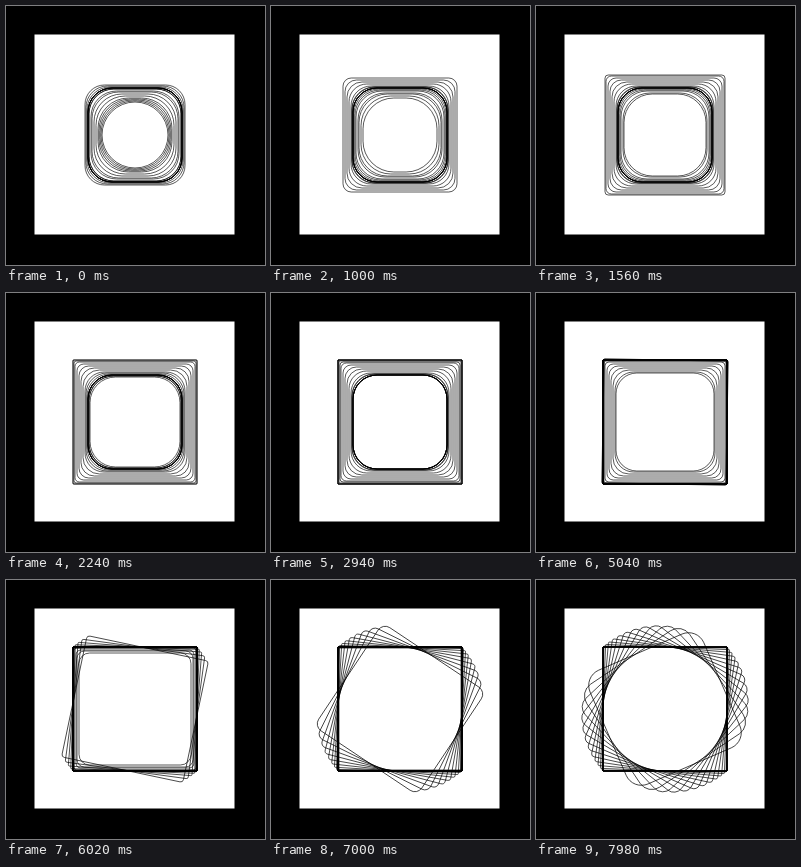
Write an HTML page with a canvas that moves like this. It is 259 px wide and 259 px high and loops after 8000 ms.

```html
<!DOCTYPE html>
<html lang="en">
<head>
<meta charset="utf-8">
<title>Staggered squares</title>
<style>
  html, body { margin: 0; width: 100%; height: 100%; overflow: hidden; background: #000; }
  canvas { display: block; width: 100vw; height: 100vh; }
</style>
</head>
<body>
<canvas id="stage"></canvas>
<script>
const SIZE = 259, CENTER = 129, LOOP = 8000;
const COUNT = 20, LAG = 275;
const MORPH = 3600, SPIN = 7900;

// Phase 0 is the moment a shape starts growing from rounded to square.
const LEAD = 1110, ROUND_AT = -4414, SPIN_AT = 5694;

const circle = { half: 33.3, radius: 33.3 };
const rounded = { half: 47, radius: 24 };
const square = { half: 62.3, radius: 0 };
const spun = { half: 62.3, radius: 45 };

const canvas = document.getElementById('stage');
const ctx = canvas.getContext('2d');

const clamp = x => Math.min(1, Math.max(0, x));
const mix = (a, b, k) => a + (b - a) * k;
const ease = x => x < 0.5 ? 2 * x * x : 1 - 2 * (1 - x) * (1 - x);
const progress = (phase, start, length) => ease(clamp((phase - start) / length));

function pose(phase) {
  const blend = (a, b, k, angle = 0) => ({
    half: mix(a.half, b.half, k),
    radius: mix(a.radius, b.radius, k),
    angle
  });
  if (phase < 0) return blend(circle, rounded, progress(phase, ROUND_AT, MORPH));
  if (phase < SPIN_AT) return blend(rounded, square, progress(phase, 0, MORPH));
  const k = progress(phase, SPIN_AT, SPIN);
  return blend(square, spun, k, Math.PI * k);
}

// Edges snap to whole pixels, so a hairline straddles two of them softly.
function outline({ half, radius, angle }) {
  const h = Math.round(half), r = Math.min(radius, h);
  ctx.save();
  ctx.translate(CENTER, CENTER);
  ctx.rotate(angle);
  ctx.beginPath();
  ctx.moveTo(0, -h);
  ctx.arcTo(h, -h, h, 0, r);
  ctx.arcTo(h, h, 0, h, r);
  ctx.arcTo(-h, h, -h, 0, r);
  ctx.arcTo(-h, -h, 0, -h, r);
  ctx.closePath();
  ctx.stroke();
  ctx.restore();
}

function fit() {
  const dpr = window.devicePixelRatio || 1;
  const w = Math.round(innerWidth * dpr), h = Math.round(innerHeight * dpr);
  if (canvas.width !== w || canvas.height !== h) {
    canvas.width = w;
    canvas.height = h;
  }
  ctx.setTransform(w / SIZE, 0, 0, h / SIZE, 0, 0);
}

function draw(t) {
  fit();
  ctx.fillStyle = '#000';
  ctx.fillRect(0, 0, SIZE, SIZE);
  ctx.fillStyle = '#fff';
  ctx.fillRect(28.5, 28.5, 200, 200);
  ctx.strokeStyle = '#000';
  ctx.lineWidth = 0.66;
  for (let i = 0; i < COUNT; i++) outline(pose(t + LEAD - i * LAG));
}

const start = performance.now();
function tick() {
  draw((performance.now() - start) % LOOP);
  requestAnimationFrame(tick);
}
tick();
</script>
</body>
</html>
```
